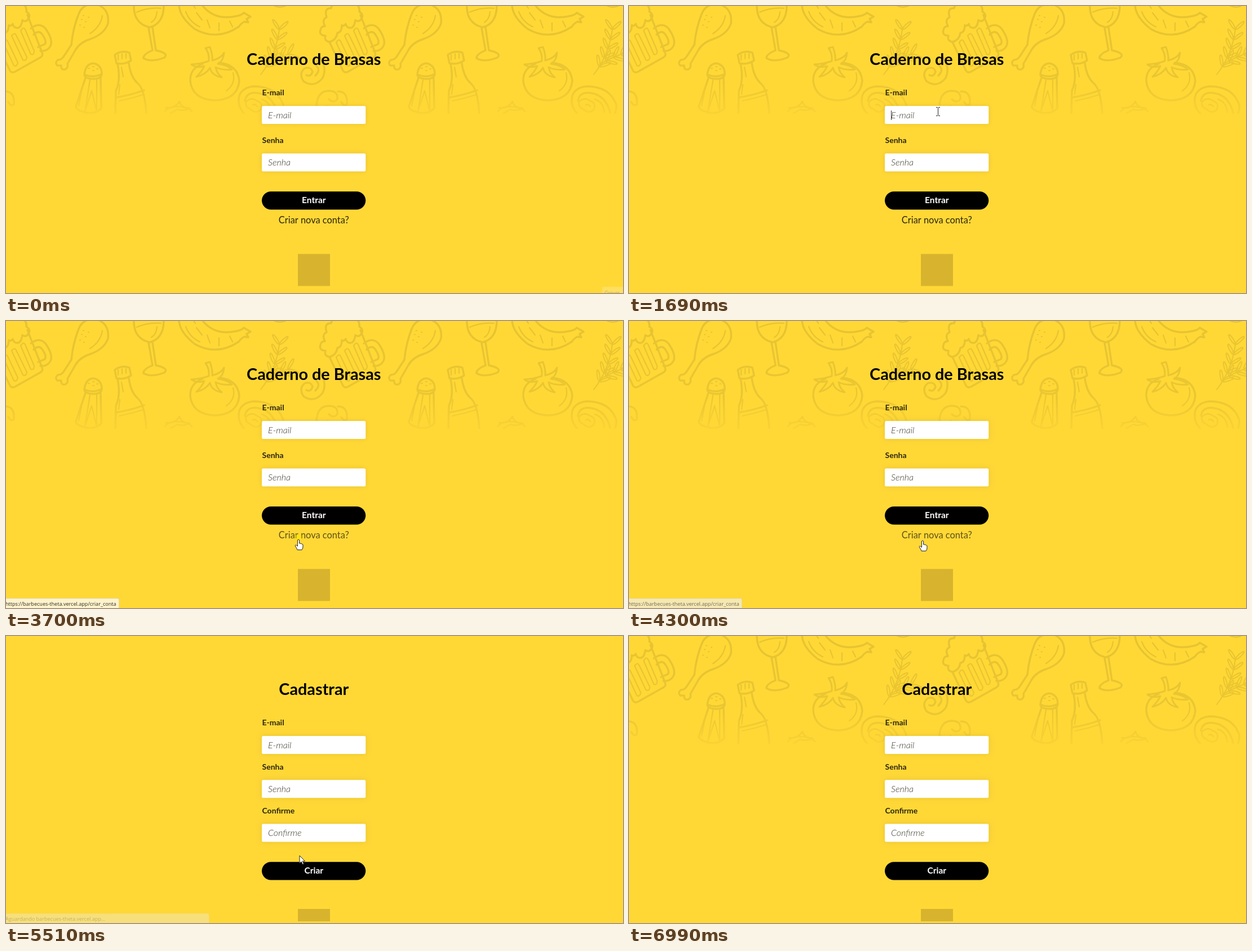
These frames come from a looping animation (1095x511 px, 8000 ms). An HTML page with a canvas:

```html
<!DOCTYPE html>
<html lang="pt-BR">
<head>
<meta charset="utf-8">
<title>Caderno de Brasas</title>
<style>
html, body { margin: 0; width: 100%; height: 100%; overflow: hidden; background: #ffd836; }
canvas { display: block; width: 1095px; height: 511px; }
</style>
</head>
<body>
<canvas id="stage" width="1095" height="511"></canvas>
<script>
const W = 1095, H = 511, LOOP = 8000, TICK = LOOP / 119;
const YELLOW = '#ffd836', INK = '#e7c331', MARK = '#d8b42e';
const ctx = document.getElementById('stage').getContext('2d');
const clamp = v => Math.max(0, Math.min(1, v));

// Doodles of the repeating backdrop: [line width, outline]
const DOODLES = [
  // beer mug
  [3.4, 'M-17 64 L7 115 Q10 120 16 117 L62 91 Q66 88 64 83 L38 16'],
  [3.4, 'M-17 64 Q-27 62 -24 53 Q-36 52 -33 43 Q-32 36 -25 36 Q-31 24 -22 20 Q-27 3 -14 4 Q-12 -6 2 -6 M24 -6 Q38 -2 36 10 Q46 16 38 25 Q34 29 29 25 Q27 40 19 39 Q13 38 12 32 Q8 37 5 34 Q5 47 -3 48 Q-5 61 -17 64'],
  [3.4, 'M44 40 Q59 28 70 40 Q84 60 79 71 Q74 81 61 80 M49 51 Q58 42 64 50 Q73 63 69 68 L57 73'],
  [2.2, 'M-5 65 Q0 57 3 63 L21 101 Q19 109 14 106 Z M10 53 Q15 46 18 52 L37 91 Q36 99 30 96 Z M26 44 Q31 36 34 42 L50 80 Q50 88 44 86 Z'],
  // drumstick
  [3.4, 'M116 69 Q119 39 129 14 Q137 -6 161 -3 Q184 5 181 31 Q175 49 152 58 Q132 64 124 77'],
  [3.4, 'M116 69 L103 89 Q99 96 92 96 Q86 101 91 106 L98 106 Q97 114 105 113 Q111 110 109 103 L124 77'],
  [2.2, 'M171 17 Q168 37 149 49 M137 17 h1 M134 24 h1 M141 28 h1 M131 34 h1 M138 38 h1 M146 20 h1'],
  // wine glass
  [3.4, 'M227 -4 Q225 31 255 38 Q281 31 280 -4 M253 39 L260 79 Q243 86 244 93 Q257 101 281 92 Q290 84 266 79 L260 38'],
  [2.2, 'M232 11 Q253 2 275 4 M268 10 Q267 24 258 29'],
  // sausage
  [3.4, 'M307 -3 Q307 19 335 41 Q374 63 413 37 Q418 30 423 28 L430 29 L427 23 L434 19 L422 12 Q419 16 409 18 Q369 27 347 -3'],
  [2.2, 'M319 10 Q326 29 344 37 M338 12 L348 25 M357 25 L362 39 M378 30 L378 44 M397 27 L402 37 M332 -2 L336 4'],
  // tomato
  [3.4, 'M349 103 Q326 111 327 134 Q331 166 370 168 Q411 167 414 133 Q411 104 378 101'],
  [3, 'M360 98 Q361 84 354 75 L362 73 Q367 87 366 97 Q382 93 387 83 Q386 98 376 103 Q393 105 401 113 Q384 115 372 109 Q374 120 383 127 Q365 124 362 110 Q355 122 338 126 Q348 116 352 107 Q337 111 329 104 Q346 103 360 98'],
  [2.2, 'M403 119 Q408 139 391 151'],
  // salt shaker
  [3.4, 'M139 122 Q141 103 155 102 Q170 105 170 121 Q169 130 155 130 Q139 129 139 122 M139 122 Q155 129 170 121 M141 128 L124 179 Q125 186 142 190 Q160 193 169 182 L168 128'],
  [2.2, 'M149 132 L140 188 L152 151 L161 188 L161 131 M146 111 h2 M154 108 h2 M161 112 h2 M154 115 h2 M134 151 L129 178'],
  // bottle
  [3.4, 'M193 87 Q205 78 219 83 L222 97 Q210 105 196 102 Z M198 103 Q204 132 195 151 L194 194 M218 102 Q221 125 232 136 Q247 147 249 194 M195 163 Q220 159 245 150'],
  [2.2, 'M199 87 v9 M206 85 v9 M213 85 v8 M205 109 L208 126 M201 169 Q222 165 243 158 M200 157 L202 140'],
  // pepper slice
  [3.4, 'M414 177 Q408 147 439 143 Q481 143 492 176 Q493 184 489 194 M414 177 Q419 191 430 197 M424 169 Q427 152 447 155 Q475 159 482 194'],
  [2.6, 'M426 171 Q434 161 446 169 Q457 173 452 185 Q443 193 433 183 Q424 180 426 171 M454 166 Q469 171 471 189 M438 176 Q443 174 446 179'],
  // curls
  [3.4, 'M558 92 Q570 111 562 128 Q547 147 528 134 Q519 120 530 111 Q541 107 544 117 Q541 127 533 123 M558 92 Q550 98 551 107 Q559 114 549 124'],
  [3.4, 'M551 177 Q553 152 572 151 Q590 151 588 166 Q581 174 573 166 M589 152 Q607 152 605 175 Q600 180 595 171 M551 177 Q561 186 571 178'],
  // half hidden tomato
  [2.6, 'M282 188 Q286 180 303 179 Q325 180 330 188 M284 181 Q299 184 308 170 Q310 181 326 182 Q313 188 304 184 L292 191'],
  [2.6, 'M473 -2 Q486 6 499 -2']
];

function quad(a, b, c, t) {
  const u = 1 - t;
  return a * u * u + 2 * b * u * t + c * t * t;
}

function sprig(g, x0, y0, cx, cy, x1, y1, pairs) {
  g.lineWidth = 2;
  g.stroke(new Path2D(`M${x0} ${y0} Q${cx} ${cy} ${x1} ${y1}`));
  for (let k = 0; k < pairs; k++) {
    const t = 0.2 + 0.8 * k / (pairs - 1);
    const x = quad(x0, cx, x1, t), y = quad(y0, cy, y1, t);
    const dir = Math.atan2(quad(y0, cy, y1, t + .02) - y, quad(x0, cx, x1, t + .02) - x);
    for (const side of [-1, 1]) {
      g.save();
      g.translate(x, y);
      g.rotate(dir + side * 0.7);
      g.beginPath();
      g.ellipse(11, 0, 10, 2.3, 0, 0, 7);
      g.stroke();
      g.restore();
    }
  }
}

function makeBackdrop() {
  const layer = document.createElement('canvas');
  layer.width = W;
  layer.height = 192;
  const g = layer.getContext('2d');
  g.strokeStyle = INK;
  g.lineCap = g.lineJoin = 'round';
  for (const dx of [-591, 0, 591]) {
    g.save();
    g.translate(dx, 0);
    for (const [width, outline] of DOODLES) {
      g.lineWidth = width;
      g.stroke(new Path2D(outline));
    }
    sprig(g, 452, 122, 479, 88, 485, 42, 5);
    sprig(g, 466, 102, 484, 92, 500, 86, 3);
    g.restore();
  }
  const fade = g.createLinearGradient(0, 0, 0, 192);
  fade.addColorStop(0, '#000');
  fade.addColorStop(.7, 'rgba(0,0,0,.85)');
  fade.addColorStop(1, 'rgba(0,0,0,.25)');
  g.globalCompositeOperation = 'destination-in';
  g.fillStyle = fade;
  g.fillRect(0, 0, W, 192);
  return layer;
}
const backdrop = makeBackdrop();

function text(str, x, y, font, color, align = 'left') {
  ctx.font = font;
  ctx.fillStyle = color;
  ctx.textAlign = align;
  ctx.fillText(str, x, y);
}

function box(x, y, w, h, r, color) {
  ctx.fillStyle = color;
  ctx.beginPath();
  ctx.roundRect(x, y, w, h, r);
  ctx.fill();
}

const lato = style => style + ' Lato, sans-serif';

function field(label, labelY, boxY) {
  text(label, 454.5, labelY, lato('bold 14px'), '#2b2410');
  ctx.save();
  ctx.shadowColor = 'rgba(0,0,0,.1)';
  ctx.shadowBlur = 8;
  box(454, boxY, 184.3, 32, 2.5, '#fff');
  ctx.restore();
  text(label, 465, boxY + 21.7, lato('italic 300 16px'), '#3b3729');
}

function button(label, y) {
  box(454, y, 184.3, 32.2, 16.1, '#000');
  text(label, 546.3, y + 21.2, lato('bold 15.5px'), '#fff', 'center');
}

function heading(str) {
  text(str, 546.3, 105, lato('bold 28.8px'), '#060400', 'center');
}

function loginPage(n) {
  heading('Caderno de Brasas');
  field('E-mail', 159, 178);
  field('Senha', 244, 262.6);
  button('Entrar', 330.2);
  const hover = n >= 52 && n < 70;
  text('Criar nova conta?', 546.3, 387, lato('16.4px'), hover ? '#5f5018' : '#2b2410', 'center');
  box(518, 441.5, 57, 57, 0, MARK);
  const caret = (n >= 25 && n < 32) || (n >= 40 && n < 48);
  if (caret) box(465, 186, 1, 17, 0, '#333');
}

function signupPage() {
  heading('Cadastrar');
  field('E-mail', 159, 178);
  field('Senha', 237.5, 256.2);
  field('Confirme', 315.5, 334.4);
  button('Criar', 402.2);
  box(518, 486, 57, 22, 0, MARK);
}

function statusBar(str, width, alpha, color) {
  if (alpha <= 0) return;
  ctx.globalAlpha = alpha;
  box(-5, 493.5, width + 5, 25, 3, '#d9cfa8');
  box(-5, 494.3, width + 4.2, 25, 2.5, color);
  text(str, -1, 506.5, '9.1px "Open Sans", sans-serif', '#2c2c2c');
  ctx.globalAlpha = 1;
}

function status(n) {
  if (n < 70) {
    const alpha = Math.min(clamp((n - 52) / 3), clamp((66 - n) / 3));
    statusBar('https://barbecues-theta.vercel.app/criar_conta', 201, alpha, '#fff3cb');
  } else {
    const alpha = n < 71 ? .6 : clamp((83 - n) / 4);
    statusBar('Aguardando barbecues-theta.vercel.app...', 361, alpha, '#f7f6f1');
  }
}

const POINTERS = {
  arrow: new Path2D('M0 0 V13.6 L3.1 10.8 L5.4 15.7 L7.4 14.8 L5.2 9.9 H9.6 Z'),
  hand: new Path2D('M-1.6 1 Q0 -1 1.6 1 V7 Q3 6 4 7.5 Q5.6 6.8 6.3 8.2 Q8 8 8 10 V13 Q8 16 6 18.5 H-2 Q-3 15 -5.5 12 Q-6.5 10 -4.5 9.6 L-1.6 12 Z'),
  beam: new Path2D('M0 .5 H2.5 L3.5 1.5 L4.5 .5 H7 M3.5 1.5 V14.5 M0 15.5 H2.5 L3.5 14.5 L4.5 15.5 H7')
};

// Pointer route: [tick, x, y]
const ROUTE = [
  [4, 967, 469], [5, 930, 424], [6, 860, 352], [7, 768, 275], [8, 748, 263], [10, 748, 263],
  [15, 787, 245], [16, 787, 245], [18, 740, 222], [20, 640, 188], [21, 580, 174], [22, 543, 175],
  [25, 545, 180], [42, 545, 180], [43, 528, 197], [44, 470, 257], [45, 433, 295],
  [48, 442, 331], [51, 492, 374], [54, 517, 388], [55, 519, 389], [59, 521, 391],
  [90, 521, 391], [92, 511, 391], [101, 511, 391], [102, 400, 309], [103, 94, 123]
];

function pointerAt(n) {
  const i = ROUTE.findIndex(p => p[0] >= n);
  const [t1, x1, y1] = ROUTE[i];
  const [t0, x0, y0] = ROUTE[Math.max(0, i - 1)];
  const k = t1 > t0 ? (n - t0) / (t1 - t0) : 1;
  return [x0 + (x1 - x0) * k, y0 + (y1 - y0) * k];
}

function pointer(n) {
  if (n < 4 || n > 103) return;
  const [x, y] = pointerAt(n);
  const kind = n >= 21 && n <= 43 ? 'beam' : n >= 52 && n < 70 ? 'hand' : 'arrow';
  ctx.save();
  ctx.translate(x, y);
  ctx.lineWidth = 1;
  ctx.lineJoin = 'round';
  ctx.strokeStyle = '#222';
  ctx.fillStyle = '#fff';
  if (kind !== 'beam') ctx.fill(POINTERS[kind]);
  ctx.stroke(POINTERS[kind]);
  ctx.restore();
}

function clickGlow(n) {
  if (n < 55 || n > 58) return;
  const glow = ctx.createRadialGradient(519, 385, 1, 519, 385, 8);
  glow.addColorStop(0, 'rgba(255,232,0,.9)');
  glow.addColorStop(1, 'rgba(255,232,0,0)');
  ctx.globalAlpha = (59 - n) / 4;
  ctx.fillStyle = glow;
  ctx.fillRect(511, 379, 16, 14);
  ctx.globalAlpha = 1;
}

function cornerHint() {
  box(1058, 500, 37, 11, [2, 0, 0, 0], '#ffdf60');
  text('Gravar', 1062, 514, lato('italic 9.5px'), '#c9ad48');
}

function draw(now) {
  const n = Math.floor((now % LOOP + 10) / TICK) % 119;
  ctx.fillStyle = YELLOW;
  ctx.fillRect(0, 0, W, H);
  if (n < 80 || n >= 85) ctx.drawImage(backdrop, 0, 0);
  if (n < 80) loginPage(n);
  else signupPage();
  if (n < 1) cornerHint();
  status(n);
  clickGlow(n);
  pointer(n);
}

const start = performance.now();
function frame() {
  draw(performance.now() - start);
  requestAnimationFrame(frame);
}
frame();
</script>
</body>
</html>
```
